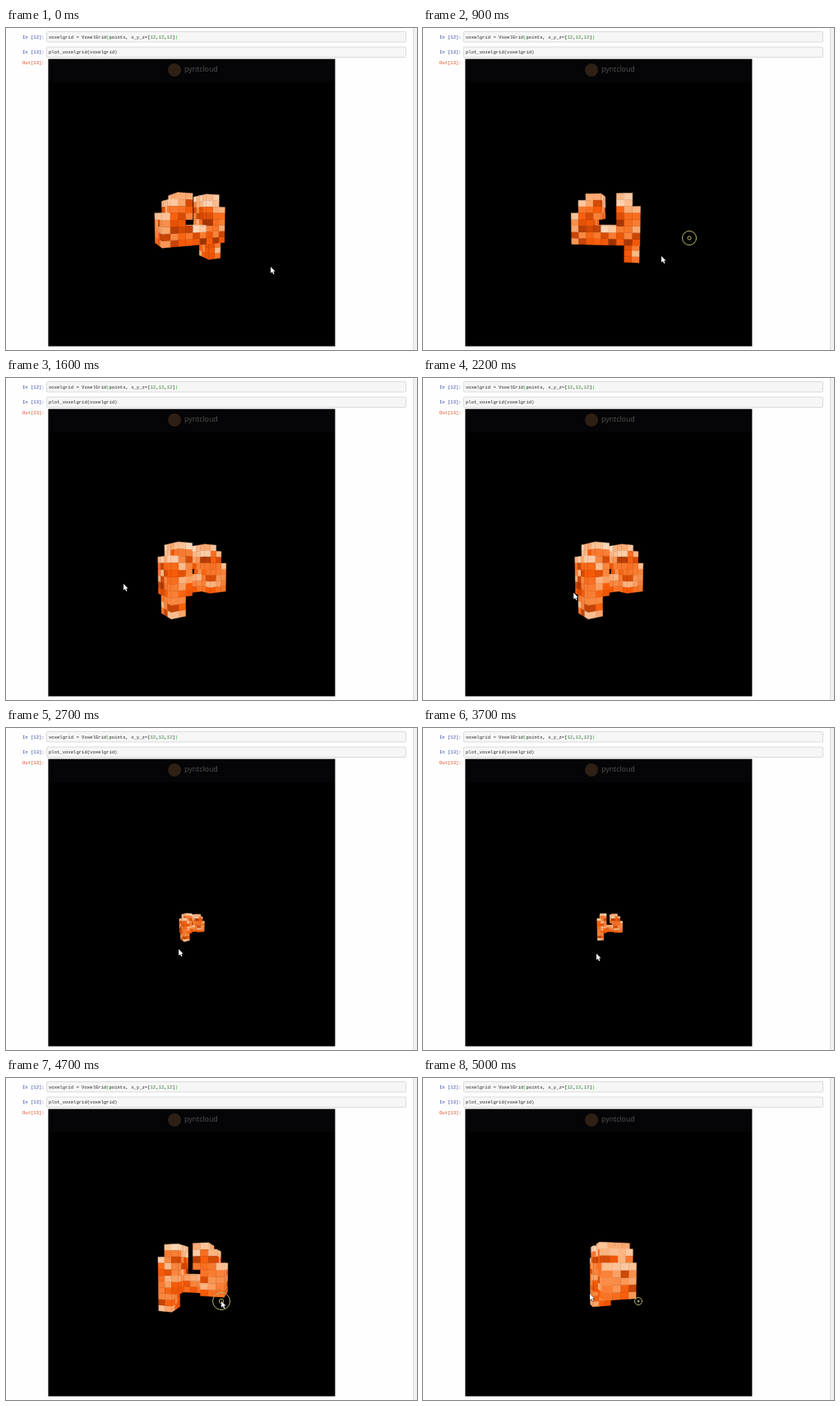
These frames come from a looping animation (500 px wide and 391 px high, 5100 ms). An HTML page with a canvas:

```html
<!DOCTYPE html>
<html lang="en">
<head>
<meta charset="utf-8">
<title>Voxel grid in a notebook</title>
<style>
  html, body { margin: 0; width: 100%; height: 100%; overflow: hidden; background: #fefefe; }
  svg, canvas { position: absolute; left: 0; top: 0; width: 500px; height: 391px; }
  .code { font: 5.57px "Liberation Mono", "DejaVu Sans Mono", monospace; white-space: pre; fill: #222; }
  .in { fill: #303f9f; }
  .out { fill: #d84315; }
  .num { fill: #2a7a2a; }
  .match { fill: #0b0; }
  .brand { font: 8.8px "Open Sans", sans-serif; fill: #555; }
  .cell { fill: #f6f6f6; stroke: #d4d4d4; stroke-width: .8; }
</style>
</head>
<body>
<svg viewBox="0 0 500 391">
  <rect x="495" width="5" height="391" fill="#f0f0f0"/>
  <rect x="495" width="1" height="391" fill="#ddd"/>
  <rect class="cell" x="49.5" y="4.5" width="437" height="12.5" rx="1"/>
  <rect class="cell" x="49.5" y="23" width="437" height="12.5" rx="1"/>
  <g class="code">
    <text class="in" x="20" y="12.5">In [12]:</text>
    <text x="52" y="12.5">voxelgrid = VoxelGrid<tspan class="match">(</tspan>points, x_y_z=[<tspan class="num">12</tspan>,<tspan class="num">12</tspan>,<tspan class="num">12</tspan>]<tspan class="match">)</tspan></text>
    <text class="in" x="20" y="31">In [13]:</text>
    <text x="52" y="31">plot_voxelgrid(voxelgrid)</text>
    <text class="out" x="20" y="44">Out[13]:</text>
  </g>
  <rect x="51.4" y="37.6" width="349" height="348.9"/>
  <rect x="52" y="38" width="348" height="28" fill="#050406"/>
  <circle cx="205" cy="51" r="8" fill="#2e2015"/>
  <text class="brand" x="217" y="53">pyntcloud</text>
</svg>
<canvas width="500" height="391"></canvas>
<script>
const ctx = document.querySelector('canvas').getContext('2d');
const LOOP = 5100, STEP = 100;
const CAMERA = 200, PITCH = 4 * Math.PI / 180, DEGREES_PER_PIXEL = .945;
const GRID = [9, 11, 4], SIZE = [8.8, 7.3, 8.5], ORIGIN = [-42, -43, -17];
const DRAGS = [[800, 1600], [4700, 5000]];

// time, x, y of the pointer tip
const POINTER = [
  [0, 322, 290], [800, 324, 255], [900, 290, 277], [1600, 143, 250], [2600, 210, 268],
  [3700, 211, 274], [4100, 188, 254], [4500, 262, 271], [4700, 262, 271], [5000, 203, 262]
];

const clamp = (v, low, high) => Math.min(high, Math.max(low, v));
const ramp = (t, from, to) => clamp((t - from) / (to - from), 0, 1);

function pointerAt(t) {
  const i = clamp(POINTER.findIndex(k => k[0] >= t), 1, POINTER.length);
  const [t0, x0, y0] = POINTER[i - 1], [t1, x1, y1] = POINTER[i];
  const f = ramp(t, t0, t1);
  return [x0 + (x1 - x0) * f, y0 + (y1 - y0) * f];
}

// Dragging to the left turns the model
function yawAt(t) {
  const pixels = DRAGS.reduce((sum, [from, to]) =>
    sum + pointerAt(from)[0] - pointerAt(clamp(t, from, to))[0], 0);
  const degrees = -25 + pixels * DEGREES_PER_PIXEL + 52 * ramp(t, 3100, 4500);
  return degrees * Math.PI / 180;
}

const zoomAt = t => .98 - .62 * (ramp(t, 2200, 2600) - ramp(t, 3700, 4200));

// A stepped lobe, a bridge along the front, and a tower with a foot at the back
function solid(x, y, z) {
  if ([x, y, z].some((v, i) => v < 0 || v >= GRID[i])) return false;
  const bridge = y >= 3 && y < 6 && z >= 2;
  const lobe = x < 4 && y >= (x < 3 ? 3 : 7) && y < 8 + 2 * x;
  const tower = x >= 6 && y >= 3 && (x < 8 || y < 9);
  const foot = x >= 7 && y < 3 && z < 3;
  return bridge || lobe || tower || foot;
}

function random(x, y, z) {
  const n = Math.sin(x * 127.1 + y * 311.7 + z * 74.7) * 43758.5453;
  return n - Math.floor(n);
}

// Pale at the top, darker along the underside, orange between
function cellColor(x, y, z) {
  let shade = .08 + .42 * (random(x, y, z) + random(z, x, y));
  if (y > 6 && !solid(x, y + 1, z)) shade *= .4;
  if (y === 3) shade = shade * .7 + .3;
  return `hsl(${28 - 11 * shade}, 94%, ${92 - 66 * shade}%)`;
}

const toModel = p => p.map((v, i) => ORIGIN[i] + v * SIZE[i]);

function exposedFaces(cell) {
  const faces = [];
  for (let axis = 0; axis < 3; axis++) for (const side of [0, 1]) {
    const next = cell.slice();
    next[axis] += side ? 1 : -1;
    if (solid(...next)) continue;
    const corners = [[0, 0], [1, 0], [1, 1], [0, 1]].map(([u, v]) => {
      const p = cell.slice();
      p[axis] += side;
      p[(axis + 1) % 3] += u;
      p[(axis + 2) % 3] += v;
      return toModel(p);
    });
    faces.push(side ? corners : corners.reverse());
  }
  return faces;
}

const voxels = [];
for (let x = 0; x < GRID[0]; x++) for (let y = 0; y < GRID[1]; y++) for (let z = 0; z < GRID[2]; z++) {
  if (!solid(x, y, z)) continue;
  const cell = [x, y, z];
  voxels.push({
    middle: toModel(cell.map(v => v + .5)),
    color: cellColor(x, y, z),
    faces: exposedFaces(cell)
  });
}

function drawModel(yaw, zoom) {
  const c = Math.cos(yaw), s = Math.sin(yaw);
  const pc = Math.cos(PITCH), ps = Math.sin(PITCH);
  const rotate = ([x, y, z]) => {
    const w = x * s + z * c;
    return [x * c - z * s, y * pc - w * ps, w * pc + y * ps];
  };
  const project = p => {
    const [x, y, w] = rotate(p), k = zoom * CAMERA / (CAMERA - w);
    return [226 + x * k, 240 - y * k];
  };
  const distance = p => {
    const [x, y, w] = rotate(p);
    return Math.hypot(x, y, CAMERA - w);
  };
  const sorted = voxels.map(v => [distance(v.middle), v]).sort((a, b) => b[0] - a[0]);
  ctx.lineWidth = .4;
  for (const [, voxel] of sorted) {
    ctx.fillStyle = ctx.strokeStyle = voxel.color;
    for (const face of voxel.faces) {
      const points = face.map(project), [a, b, d] = points;
      if ((b[0] - a[0]) * (d[1] - a[1]) >= (b[1] - a[1]) * (d[0] - a[0])) continue;
      ctx.beginPath();
      for (const p of points) ctx.lineTo(...p);
      ctx.closePath();
      ctx.fill();
      ctx.stroke();
    }
  }
}

// A ring shrinks where each drag began
function drawPress(t) {
  for (const [start] of DRAGS) {
    const age = t - start;
    if (age < 0 || age >= 500) continue;
    const [x, y] = pointerAt(start), radius = 10.5 - age / 50;
    ctx.strokeStyle = '#b9b46a';
    ctx.lineWidth = 1;
    for (const r of [radius, radius / 4]) {
      ctx.beginPath();
      ctx.arc(x, y, r, 0, 7);
      ctx.stroke();
    }
  }
}

const arrow = new Path2D('M0 0V8.6L2 6.8L3.5 10L4.9 9.4L3.5 6.2H6.1Z');

function drawPointer([x, y]) {
  ctx.save();
  ctx.translate(x, y);
  ctx.scale(.9, .9);
  ctx.strokeStyle = '#000';
  ctx.lineWidth = 1;
  ctx.stroke(arrow);
  ctx.fillStyle = '#fff';
  ctx.fill(arrow);
  ctx.restore();
}

const begin = performance.now();
function frame() {
  const t = Math.floor((performance.now() - begin) % LOOP / STEP) * STEP;
  ctx.clearRect(0, 0, 500, 391);
  drawModel(yawAt(t), zoomAt(t));
  drawPress(t);
  drawPointer(pointerAt(t));
  requestAnimationFrame(frame);
}
frame();
</script>
</body>
</html>
```
